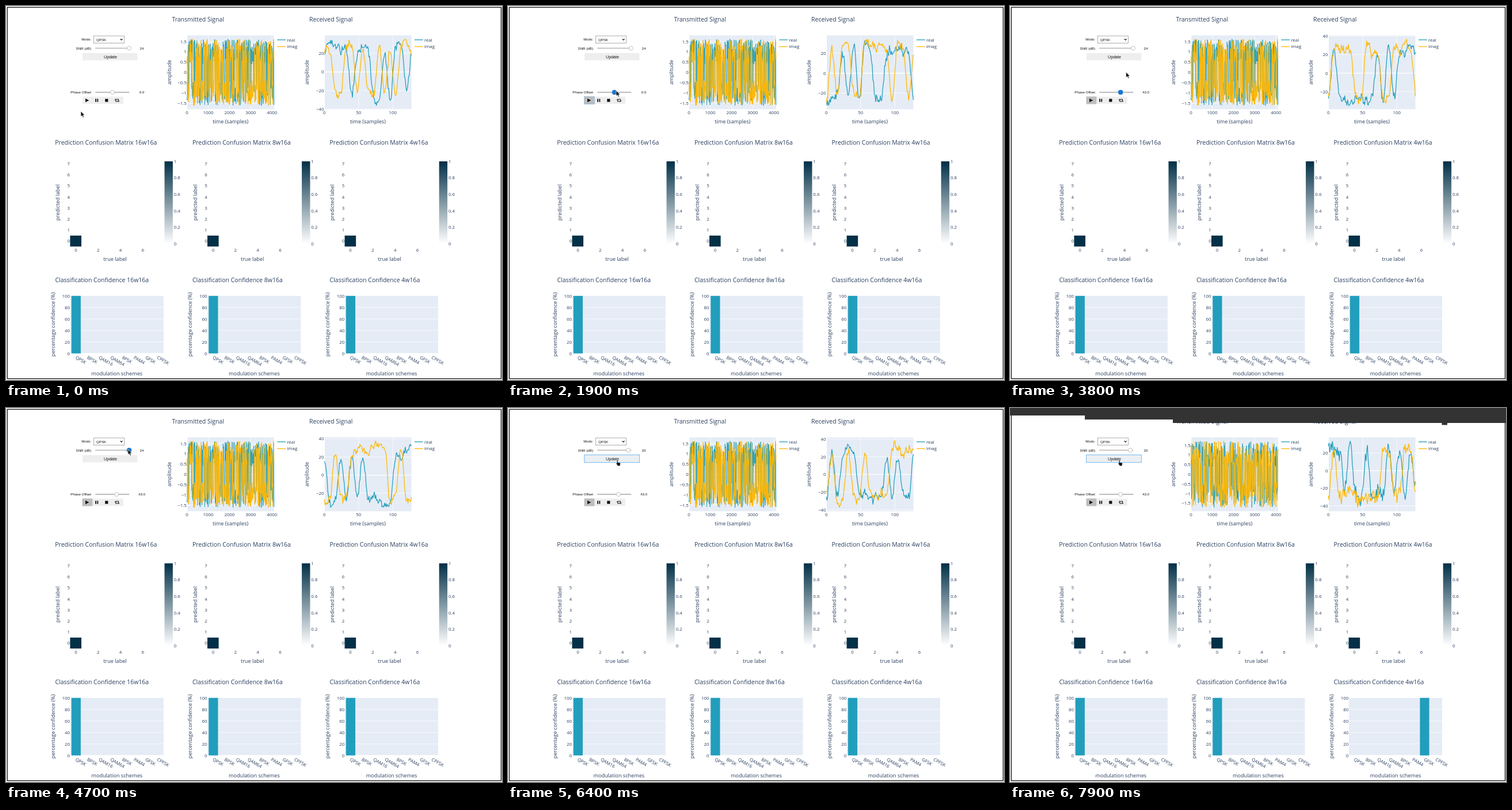
Write an HTML page that moves like this. It is 862 px wide and 650 px high and loops after 8000 ms.

```html
<!DOCTYPE html>
<html lang="en">
<head>
<meta charset="utf-8">
<style>
html, body { margin: 0; width: 100%; height: 100%; overflow: hidden; background: #fff; }
svg { display: block; width: 862px; height: 650px; }
text { font-family: "Open Sans", sans-serif; fill: #2a3f5f; }
.ui { font-family: "Liberation Sans", Arial, sans-serif; fill: #111; }
.trace { fill: none; stroke-miterlimit: 2; }
</style>
</head>
<body>
<svg viewBox="0 0 862 650">
  <defs>
    <linearGradient id="scale" x1="0" y1="0" x2="0" y2="1">
      <stop offset="0" stop-color="#023047"/><stop offset="1" stop-color="#fff"/>
    </linearGradient>
  </defs>
  <g id="fixed"></g>
  <g id="live"></g>
</svg>
<script>
const LOOP = 8000, PLAY = 400, UPDATE = 6500;
const TEAL = '#219ebc', AMBER = '#ffb703', NAVY = '#023047', PANEL = '#e5ecf6';
const COLUMN = 238.6, TITLE = 10.5, AXIS = 9.1, TICK = 7.86;
const TOP = 51, BOTTOM = 179.4, WIDTH = 151.2, SENT_X = 314.6, RECEIVED_X = 553.3;
const SCHEMES = ['QPSK', 'BPSK', 'QAM16', 'QAM64', '8PSK', 'PAM4', 'GFSK', 'CPFSK'];

// Spans of time in which the picture is refreshed every 100 ms
const SPANS = [[0, 1100], [1500, 2400], [2900, 2900], [3100, 3300], [3700, 4400], [4600, 4700],
  [4900, 5200], [5500, 6500], [6700, 6800], [7100, 7400], [7600, 7900]];

// time, x, y of the pointer tip
const POINTER = [[0, 130, 183], [300, 141, 164], [400, 141, 164], [700, 180, 238], [1100, 190, 202],
  [1800, 188, 147], [2300, 188, 148], [2900, 193, 150], [3300, 193, 150], [4400, 212, 73],
  [4700, 212, 72], [5500, 206, 77], [6000, 190, 91]];
const PHASE = [[1900, 0], [2400, 16], [2900, 41], [3300, 43]];
const SNR = [[4700, 24], [5200, 20]];

function random(seed) {
  let s = seed * 7919 + 12345 | 0;
  return () => {
    s = s + 0x6d2b79f5 | 0;
    let r = Math.imul(s ^ s >>> 15, 1 | s);
    r = r + Math.imul(r ^ r >>> 7, 61 | r) ^ r;
    return ((r ^ r >>> 14) >>> 0) / 4294967296;
  };
}

function track(keys, t, field = 1) {
  const next = keys.findIndex(k => k[0] > t);
  if (next === 0) return keys[0][field];
  if (next < 0) return keys[keys.length - 1][field];
  const a = keys[next - 1], b = keys[next];
  return a[field] + (b[field] - a[field]) * (t - a[0]) / (b[0] - a[0]);
}

const rect = (x, y, w, h, fill, extra = '') =>
  `<rect x="${x}" y="${y}" width="${w}" height="${h}" fill="${fill}" ${extra}/>`;
const path = (d, extra) => `<path d="${d}" ${extra}/>`;
const text = (s, x, y, size, anchor = 'start', extra = '') =>
  `<text x="${x}" y="${y + size * 0.36}" font-size="${size}" text-anchor="${anchor}" ${extra}>${s}</text>`;
const upright = (s, x, y) => text(s, 0, 0, AXIS, 'middle', `transform="translate(${x} ${y}) rotate(-90)"`);
const line = (x1, y1, x2, y2, color, width) =>
  path(`M${x1} ${y1}L${x2} ${y2}`, `fill="none" stroke="${color}" stroke-width="${width}"`);
const label = (s, x, y, anchor, size = 6.2) => text(s, x, y, size, anchor, 'class="ui"');
const signed = v => (v < 0 ? '−' : '') + Math.abs(v);

function matrix(x, name) {
  let out = text('Prediction Confusion Matrix ' + name, x - 26.4, 237.5, TITLE);
  out += rect(x - 0.3, 399, 19.6, 19, NAVY);
  for (let i = 0; i < 8; i++) {
    out += text(i, x - 0.6, 408 - i * 19.07, TICK, 'end');
    if (i % 2 === 0) out += text(i, x + 9.7 + i * 19.4, 424, TICK, 'middle');
  }
  out += text('true label', x + 77.8, 439.3, AXIS, 'middle') + upright('predicted label', x - 22, 341.5);
  out += rect(x + 163.8, 270, 14.4, 143, 'url(#scale)');
  for (let i = 0; i < 6; i++) out += text(i / 5, x + 180, 413 - i * 28.6, TICK);
  return out;
}

function barChart(x, name) {
  let out = text('Classification Confidence ' + name, x - 26.4, 476, TITLE) + rect(x, 503.8, 162, 100, PANEL);
  for (let i = 0; i < 6; i++) {
    const y = 603.8 - i * 20;
    if (i < 5) out += line(x, y, x + 162, y, '#fff', i ? 0.7 : 1.3);
    out += text(i * 20, x - 0.8, y, TICK, 'end');
  }
  SCHEMES.forEach((s, i) => {
    out += text(s, 0, 1.2, TICK, 'start', `transform="translate(${x + 10.1 + i * 20.25} 609) rotate(30)"`);
  });
  return out + text('modulation schemes', x + 81, 638.5, AXIS, 'middle') + upright('percentage confidence (%)', x - 30.5, 553.5);
}

function legend(x) {
  return [['real', TEAL], ['imag', AMBER]].map(([s, color], i) => {
    const y = 58.8 + i * 11.8;
    return line(x, y, x + 14.8, y, color, 1.3) + text(s, x + 17, y, TICK);
  }).join('');
}

function signalPanel(x, title, step, perUnit) {
  let out = text(title, x - 26.2, 22.8, TITLE) + rect(x, TOP, WIDTH, BOTTOM - TOP, PANEL);
  for (let v = 0; v * perUnit < WIDTH; v += step) {
    const px = x + v * perUnit;
    out += line(px, TOP, px, BOTTOM, '#fff', v ? 0.7 : 1.3) + text(v, px, 185, TICK, 'middle');
  }
  return out + text('time (samples)', x + 75.6, 200.7, AXIS, 'middle') + legend(x + 156.7);
}

// Fits the value axis to both series and draws them, the second one on top
function plot(x, titleX, real, imag, tickStep, strokeWidth) {
  const all = real.concat(imag), low = Math.min(...all), high = Math.max(...all);
  const unit = (BOTTOM - TOP) * 0.9 / (high - low), zero = (TOP + BOTTOM) / 2 + unit * (low + high) / 2;
  const step = tickStep(high - low);
  let out = upright('amplitude', titleX(step), 115.2);
  for (let k = Math.ceil((zero - BOTTOM) / unit / step); zero - k * step * unit >= TOP; k++) {
    const y = zero - k * step * unit;
    out += line(x, y, x + WIDTH, y, '#fff', k ? 0.7 : 1.3) + text(signed(k * step), x - 0.8, y, TICK, 'end');
  }
  const trace = (values, color) => path('M' + values.map((v, i) =>
    `${(x + i * WIDTH / (values.length - 1)).toFixed(2)} ${(zero - v * unit).toFixed(1)}`).join('L'),
    `class="trace" stroke="${color}" stroke-width="${strokeWidth}"`);
  return out + trace(real, TEAL) + trace(imag, AMBER);
}

// Random symbols, eight samples each, eased into one another with noise on top
function receivedSeries(next, noise) {
  const level = () => (next() < 0.5 ? -1 : 1) * (17 + next() * 14);
  const values = [];
  let from = level(), to = level();
  for (let i = 0; i < 128; i++) {
    if (i && i % 8 === 0) [from, to] = [to, level()];
    const ease = (1 - Math.cos(Math.PI * (i % 8) / 8)) / 2;
    const bulge = from * to > 0 ? Math.sign(from) * 4 * Math.sin(Math.PI * (i % 8) / 8) : 0;
    values.push(from + (to - from) * ease + bulge + (next() + next() - 1) * noise);
  }
  return values;
}

function received(t) {
  const next = random(t < PLAY ? 1 : t === 2400 ? 2300 : t);
  const noise = t < UPDATE ? 6 : 11;
  return plot(RECEIVED_X, () => 523, receivedSeries(next, noise), receivedSeries(next, noise), () => 20, 1.25);
}

function sentSeries(next, peak) {
  const values = [];
  for (let symbol = 0; symbol < 250; symbol++) {
    const sign = next() < 0.5 ? -1 : 1;
    for (let j = 0; j < 2; j++) values.push(sign * (0.4 + (peak - 0.4) * next() ** 1.2));
  }
  return values;
}

function transmitted(t) {
  const peak = t < UPDATE ? 1.62 : t < 7600 ? 1.9 : 1.72;
  const next = random(t < UPDATE ? 11 : t);
  return plot(SENT_X, step => step === 1 ? 289 : 284, sentSeries(next, peak), sentSeries(next, peak),
    span => span > 3.6 ? 1 : 0.5, 1);
}

function bars(t) {
  const bar = (column, scheme, percent) =>
    rect(113.7 + column * COLUMN + scheme * 20.25, 603.8 - percent, 16.2, percent, TEAL);
  const split = t >= 6700 && t < 7200;
  return (split ? bar(0, 0, 50) + bar(0, 4, 50) : bar(0, 0, 100))
    + bar(1, 0, 100) + bar(2, t >= 7700 ? 6 : 0, 100);
}

function controls() {
  let out = label('Mods:', 148, 58.2, 'end') + label('SNR (dB)', 148, 73.4, 'end') + label('Phase Offset', 148, 150, 'end');
  out += rect(152.5, 52, 53, 12.6, '#fff', 'stroke="#999" stroke-width="0.8"') + label('QPSK', 157, 58.3);
  out += path('M198.6 57.2l2 2 2-2', 'fill="none" stroke="#111" stroke-width="1.1"');
  return out + [73.4, 150].map(y => rect(155, y - 0.9, 59.5, 1.8, '#bdbdbd', 'rx="0.9"')).join('');
}

function thumb(x, y, focused) {
  const [radius, fill, stroke] = focused ? [4, '#1976d2', '#1976d2'] : [3.5, '#fff', '#aaa'];
  return `<circle cx="${x}" cy="${y}" r="${radius}" fill="${fill}" stroke="${stroke}" stroke-width="0.7"/>`;
}

function playButtons(t) {
  let out = rect(133, 157.6, 70.8, 12.6, '#eee');
  if (t >= PLAY) out += rect(132.5, 157.3, 17.7, 13.2, '#bdbdbd', t < 2000 ? 'stroke="#90b8dc" stroke-width="0.8"' : '');
  out += path('M138 160.8L144.2 164L138 167.2Z', 'fill="#111"');
  out += rect(155.2, 161.3, 1.8, 5.4, '#111') + rect(158.4, 161.3, 1.8, 5.4, '#111') + rect(172.2, 161.4, 5.2, 5.2, '#111');
  return out + path('M194 166h-3.4v-3.4M192.2 162h3.3v3.4M189 163.6l1.6-2 1.6 2M193.9 164.6l1.6 2 1.6-2',
    'fill="none" stroke="#111" stroke-width="1"');
}

function widgets(t) {
  const phase = Math.round(track(PHASE, t)), snr = Math.round(track(SNR, t));
  const clicked = t >= 6000;
  return thumb(214 - (24 - snr) * 1.22, 73.4, t >= 4600 && !clicked) + label(snr, 236, 73.4, 'middle')
    + thumb(185 + phase / 6, 150, t >= 1800 && t < 4600) + label(phase.toFixed(1), 236, 150, 'middle')
    + (clicked ? rect(132.6, 81.4, 96, 13.2, '#eceff2', 'stroke="#64b5f6" stroke-width="0.9"') : rect(133, 81.8, 95.4, 12.6, '#eee'))
    + label('Update', 181.5, 88, 'middle', 7.1) + playButtons(t);
}

function pointer(t) {
  const x = track(POINTER, t), y = track(POINTER, t, 2);
  const overButton = (x > 133 && x < 229 && y > 82 && y < 95) || (x > 133 && x < 204 && y > 157 && y < 170);
  const shape = overButton
    ? 'M-.8 0Q.3-.9 1.1.2V3.4L4.9 4.2Q5.7 4.6 5.5 6L4.8 8.3V9.8H.2V8.6L-2.4 5.4Q-2.3 4.2-.8 5.2Z'
    : 'M0 0V9.2L2.2 7.3L3.8 10.8L5.4 10L3.9 6.8H6.8Z';
  return path(shape, `transform="translate(${x} ${y})" fill="#111" stroke="#fff" stroke-width="0.6"`);
}

const closing = path('M0 0H862V26H760V29.5H750.5V26H283V20H130V13H0Z', 'fill="#333"');

document.getElementById('fixed').innerHTML =
  rect(2.3, 2.3, 858.2, 645.4, '#fff', 'stroke="#111" stroke-width="1.3"')
  + signalPanel(SENT_X, 'Transmitted Signal', 1000, 0.0369) + signalPanel(RECEIVED_X, 'Received Signal', 50, 1.19)
  + ['16w16a', '8w16a', '4w16a'].map((name, i) => matrix(111.7 + i * COLUMN, name) + barChart(111.8 + i * COLUMN, name)).join('')
  + controls();

const live = document.getElementById('live');
let shown = -1;

function lastStep(t) {
  const span = SPANS.filter(s => s[0] <= t).pop();
  return Math.min(span[1], Math.floor(t / 100) * 100);
}

function render(t) {
  const step = lastStep(t);
  if (step === shown) return;
  shown = step;
  live.innerHTML = transmitted(step) + received(step) + bars(step) + widgets(step) + pointer(step)
    + (step >= 7900 ? closing : '');
}

const start = performance.now();
function tick() {
  render((performance.now() - start) % LOOP);
  requestAnimationFrame(tick);
}
tick();
</script>
</body>
</html>
```
